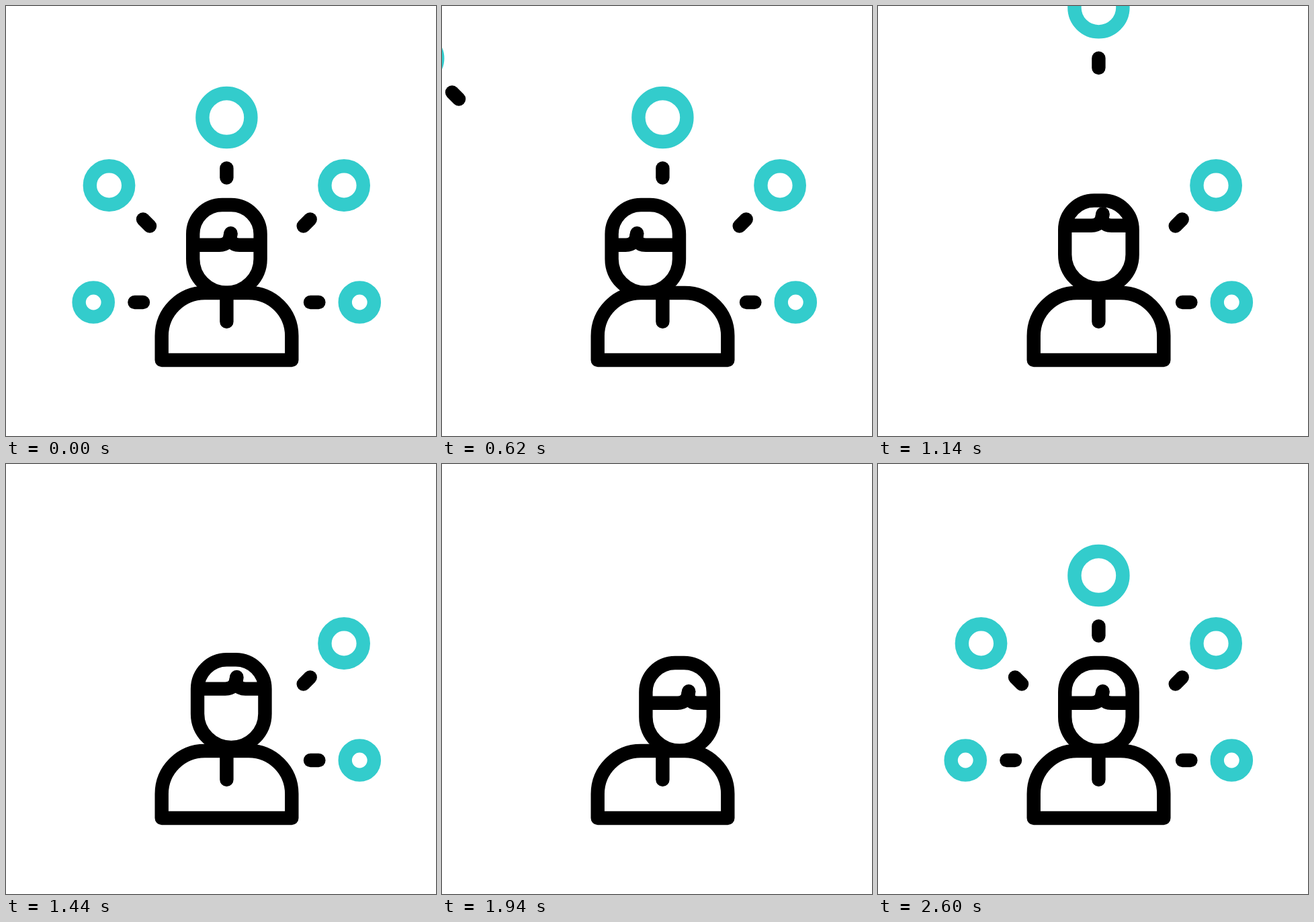
An HTML page with a canvas that plays this animation: 640x640 px, repeating every 2620 ms.

```html
<!DOCTYPE html>
<html lang="en">
<head>
<meta charset="utf-8">
<title>Person and network</title>
<style>
  html, body { margin: 0; width: 100%; height: 100%; overflow: hidden; background: #fff; }
  canvas { display: block; width: 100vmin; height: 100vmin; }
</style>
</head>
<body>
<canvas id="stage" width="640" height="640"></canvas>
<script>
const ctx = document.getElementById('stage').getContext('2d');
const LOOP = 2620, LINE = 20.4;
const INK = '#000', TEAL = '#33cccc';
const FADE_START = 2160, FADE_TIME = 304;
const EXIT_TIME = 400, TURN_TIME = 487;

// Each node: ring, dash ends, exit travel and start time.
const nodes = [
  { x: 130.2, y: 441, r: 21.6, dash: [191.4, 441, 204, 441], exit: [-300, 0], start: 313 },
  { x: 153.5, y: 267, r: 28.7, dash: [204, 317.5, 214, 327.5], exit: [-300, -300], start: 386 },
  { x: 328.4, y: 166, r: 36, dash: [328.4, 241.4, 328.4, 255.6], exit: [0, -340], start: 946 },
  { x: 503.1, y: 267, r: 28.7, dash: [452.7, 317.5, 442.7, 327.5], exit: [300, -300], start: 1594 },
  { x: 526.3, y: 441, r: 21.6, dash: [453, 441, 465.4, 441], exit: [300, 0], start: 1672 }
];

// Head offset followed by hair offset.
const CENTER = [0, 0, 0, 0];
const turns = [
  { start: 0, to: [-25.6, 0, -44.3, 0] },
  { start: 638, to: [0, -6.5, 0, -29] },
  { start: 1275, to: [25.4, 0, 33, 0] },
  { start: 1914, to: CENTER }
];

const clamp = v => Math.min(1, Math.max(0, v));
const ease = (t, start, time) => {
  const u = clamp((t - start) / time);
  return u * u * (3 - 2 * u);
};

function stroke(color, trace) {
  ctx.strokeStyle = color;
  ctx.beginPath();
  trace();
  ctx.stroke();
}

function drawNode(node, t) {
  const fading = t >= FADE_START;
  const k = fading ? 0 : ease(t, node.start, EXIT_TIME);
  if (k === 1) return;
  const [x1, y1, x2, y2] = node.dash;
  ctx.save();
  ctx.globalAlpha = fading ? clamp((t - FADE_START) / FADE_TIME) : 1;
  ctx.translate(node.exit[0] * k, node.exit[1] * k);
  stroke(TEAL, () => ctx.arc(node.x, node.y, node.r, 0, Math.PI * 2));
  stroke(INK, () => { ctx.moveTo(x1, y1); ctx.lineTo(x2, y2); });
  ctx.restore();
}

function drawBody() {
  stroke(INK, () => {
    ctx.moveTo(231.7, 527);
    ctx.lineTo(231.7, 491);
    ctx.arc(295.7, 491, 64, Math.PI, Math.PI * 1.5);
    ctx.arc(361.3, 491, 64, -Math.PI / 2, 0);
    ctx.lineTo(425.3, 527);
    ctx.closePath();
  });
  stroke(INK, () => { ctx.moveTo(328.4, 427); ctx.lineTo(328.4, 469.8); });
}

function headPose(t) {
  let pose = CENTER;
  for (const { start, to } of turns) {
    const k = ease(t, start, TURN_TIME);
    pose = pose.map((v, i) => v + (to[i] - v) * k);
  }
  return pose;
}

function drawHead(t) {
  const [dx, dy, hairX, hairY] = headPose(t);
  const cx = 328.4 + dx, half = 50.2, corner = 43.5;
  const left = cx - half, right = cx + half, top = 296 + dy;
  stroke(INK, () => {
    ctx.arc(cx, 376.4 + dy, half, 0, Math.PI);
    ctx.arc(left + corner, top + corner, corner, Math.PI, Math.PI * 1.5);
    ctx.arc(right - corner, top + corner, corner, -Math.PI / 2, 0);
    ctx.closePath();
  });

  const x = 334.5 + hairX, y = 338.2 + hairY, band = y + 17.6;
  ctx.lineCap = 'butt';
  stroke(INK, () => {
    ctx.moveTo(left, band);
    ctx.lineTo(x - 17, band);
    ctx.bezierCurveTo(x - 7, band, x - 0.5, band - 6, x, y);
  });
  stroke(INK, () => {
    ctx.moveTo(x, y);
    ctx.bezierCurveTo(x - 3, y + 10, x + 2, band, x + 13, band);
    ctx.lineTo(right, band);
  });
  ctx.fillStyle = INK;
  ctx.beginPath();
  ctx.arc(x, y, LINE / 2, 0, Math.PI * 2);
  ctx.fill();
  ctx.lineCap = 'round';
}

function render(now) {
  const t = now % LOOP;
  ctx.fillStyle = '#fff';
  ctx.fillRect(0, 0, 640, 640);
  ctx.lineWidth = LINE;
  ctx.lineCap = ctx.lineJoin = 'round';
  nodes.forEach(node => drawNode(node, t));
  drawBody();
  drawHead(t);
}

const begin = performance.now();
function tick() {
  render(performance.now() - begin);
  requestAnimationFrame(tick);
}
tick();
</script>
</body>
</html>
```
